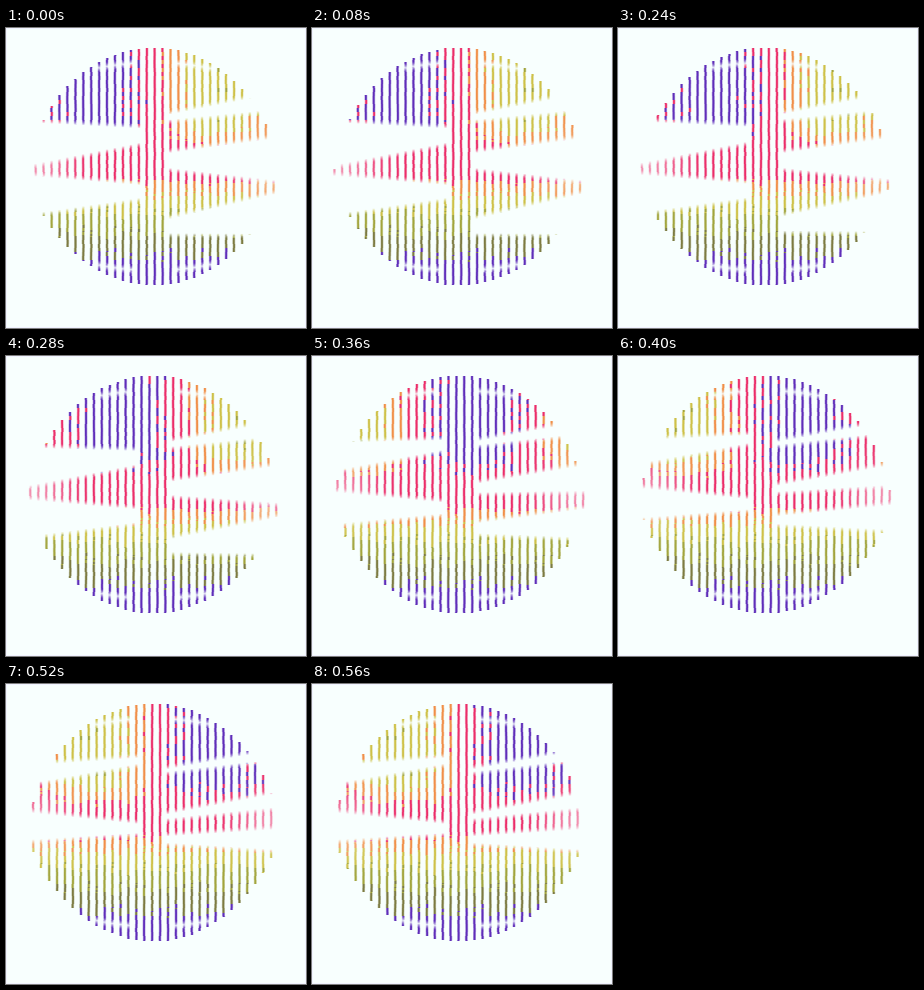
Recreate the animation shown at these times as an HTML page with a canvas. Size 300 px wide and 300 px high, loop 0.6 s.

```html
<!DOCTYPE html>
<html>
<head>
<meta charset="utf-8">
<style>
html, body { margin: 0; width: 100%; height: 100%; overflow: hidden; background: #f8fffe; }
canvas { display: block; width: 300px; height: 300px; }
</style>
</head>
<body>
<canvas id="stage" width="300" height="300"></canvas>
<script>
const ctx = document.getElementById('stage').getContext('2d');
const LOOP = 600, STEP = 40;
const CX = 147.5, CY = 138, RX = 125.5, RY = 119;
const PITCH = 7.93, DRIFT = 0.45;
const COLUMN = 13;          // half width of the core that no wedge cuts
const WAVE_LENGTH = 250;

// Purple, red, orange, yellow, olive, dark olive, purple.
const INKS = ['#5520b5', '#ea2060', '#f0883c', '#cbbd3c', '#9c9f30', '#747235', '#5520b5'];

// Wedges cut in from the left (-1) or right (1).
// Each pose: height at the rim, height at the core, half thickness at the rim.
const WEDGES = [
  { side: -1, from: [114, 107, 20], to: [88, 76, 9] },
  { side: -1, from: [166, 163, 18], to: [142, 144, 13] },
  { side: 1, from: [75, 89, 8], to: [72, 86, 5] },
  { side: 1, from: [131, 132, 20], to: [118, 132, 7] },
  { side: 1, from: [187, 198, 19], to: [155, 155, 10] }
];

const mix = (a, b, t) => a + (b - a) * t;
const clamp = (v, low, high) => Math.max(low, Math.min(high, v));
const smooth = v => {
  const t = clamp(v, 0, 1);
  return t * t * (3 - 2 * t);
};

function hash(a, b) {
  const s = Math.sin(a * 127.1 + b * 311.7) * 43758.5453;
  return s - Math.floor(s);
}

// Wedge sections met by the stripe at x: centre and half height.
function cutsAt(x, turn) {
  const offset = x - CX;
  const cuts = [];
  for (const { side, from, to } of WEDGES) {
    const depth = offset * side - COLUMN;
    if (depth < 0) continue;
    const [rim, core, thickness] = from.map((v, i) => mix(v, to[i], turn));
    const t = depth / 95;
    cuts.push({ y: mix(core, rim, t), half: thickness * mix(0.4, 1, t) });
  }
  // Thin arcs near both poles.
  if (Math.abs(offset) > 20 && Math.abs(offset) < 58) {
    const arc = 104 - 7 * (offset / 62) ** 2;
    cuts.push({ y: CY - arc, half: 0.5 }, { y: CY + arc, half: 0.5 });
  }
  return cuts;
}

// Upper half: a sideways colour wave. Lower half: a fixed ramp down to purple.
function toneAt(x, y, turn) {
  if (y > 150) return 1 + 5 * ((y - 150) / 90) ** 0.7;
  const purpleX = mix(88, 212, turn);
  const wave = -Math.cos((x - purpleX) / WAVE_LENGTH * 2 * Math.PI);
  return 1 + wave * (wave > 0 ? 2.3 : 1) * smooth((130 - y) / 40);
}

function opacityAt(x, y, cuts) {
  const clearance = Math.min(6, ...cuts.map(cut => Math.abs(y - cut.y) - cut.half));
  const rim = smooth((Math.abs(x - CX) - 55) / 65);
  const waist = Math.exp(-(((y - CY) / 32) ** 2));
  return clamp((clearance + 1) / 5, 0, 1) * (1 - 0.55 * rim * waist);
}

function drawStripe(x, index, turn) {
  const reach = 1 - ((x - CX) / RX) ** 2;
  if (reach <= 0) return;
  const half = RY * reach ** 0.62;
  const middle = CY + 7 * (1 - reach) ** 6;
  const cuts = cutsAt(x, turn);
  for (let y = Math.ceil(middle - half); y < middle + half; y++) {
    const grain = hash(index, Math.floor(y / 4)) - 0.5;
    const tone = clamp(Math.round(toneAt(x, y, turn) + grain * 0.7), 0, INKS.length - 1);
    const opacity = opacityAt(x, y, cuts);
    const left = x + grain * 0.5;
    ctx.fillStyle = INKS[tone];
    ctx.globalAlpha = opacity * 0.35;
    ctx.fillRect(left - 1.5, y, 3, 1);
    ctx.globalAlpha = opacity * 0.9;
    ctx.fillRect(left - 0.9, y, 1.8, 1);
  }
  ctx.globalAlpha = 1;
}

function draw(time) {
  // The first pose is held for two steps.
  const step = Math.max(0, Math.floor((time % LOOP) / STEP) - 1);
  const turn = smooth((step - 4) / 7);
  ctx.fillStyle = '#f8fffe';
  ctx.fillRect(0, 0, 300, 300);
  ctx.strokeStyle = '#f0f2ff';
  ctx.strokeRect(0.5, 0.5, 299, 299);
  const start = 21.8 + step * DRIFT;
  for (let i = 0; i < 33; i++) drawStripe(start + i * PITCH, i, turn);
  requestAnimationFrame(() => draw(performance.now() - origin));
}

const origin = performance.now();
draw(0);
</script>
</body>
</html>
```
